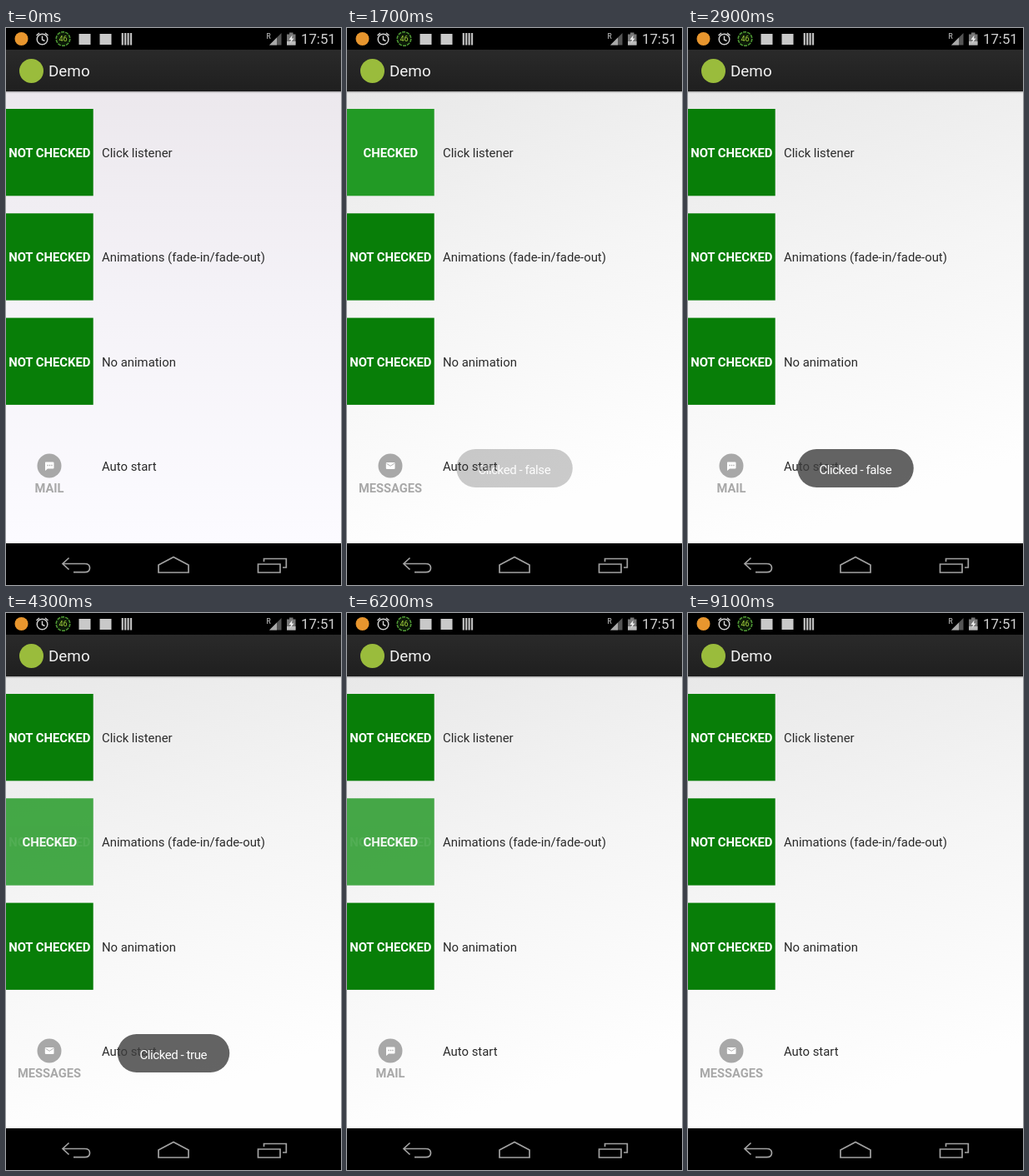
An HTML page for the animation above (9200 ms loop, 402 by 668 pixels).

```html
<!DOCTYPE html>
<html lang="en">
<head>
<meta charset="utf-8">
<title>Demo</title>
<style>
html, body { margin: 0; width: 100%; height: 100%; overflow: hidden; background: #000; }
svg { display: block; width: 100vw; height: 100vh; }
text { font-family: Roboto, "Noto Sans", sans-serif; font-size: 14.85px; }
.label { fill: #2a2a2a; }
.caption { font-weight: 700; text-anchor: middle; fill: #fff; }
.mail { font-size: 14.66px; font-weight: 700; text-anchor: middle; fill: #a8a8a8; }
.toast { font-size: 15px; letter-spacing: -.42px; text-anchor: middle; fill: #fff; }
.nav { fill: none; stroke: #a2a2a2; stroke-width: 1.7; }
</style>
</head>
<body>
<svg viewBox="0 0 402 668">
  <defs>
    <linearGradient id="page" x1="0" y1="0" x2=".25" y2="1">
      <stop offset="0" stop-color="#e8e8e8"/>
      <stop offset=".5" stop-color="#f5f5f5"/>
      <stop offset="1" stop-color="#fefefe"/>
    </linearGradient>
    <linearGradient id="tint" x1="0" y1="0" x2="0" y2="1">
      <stop offset="0" stop-color="#ece8ed"/>
      <stop offset=".5" stop-color="#f5f3f8"/>
      <stop offset="1" stop-color="#fcfbff"/>
    </linearGradient>
    <linearGradient id="bar" x1="0" y1="0" x2="0" y2="1">
      <stop offset="0" stop-color="#2a2a2a"/>
      <stop offset="1" stop-color="#1f1f1f"/>
    </linearGradient>
  </defs>

  <rect width="402" height="668"/>
  <rect y="76" width="402" height="542" fill="url(#page)"/>
  <rect id="wash" y="76" width="402" height="542" fill="url(#tint)"/>
  <rect y="26" width="402" height="50" fill="url(#bar)"/>
  <rect y="76" width="402" height="1.5" fill="#000" opacity=".22"/>

  <!-- status bar -->
  <circle cx="18.500" cy="13" r="8" fill="#e8962e"/>
  <g fill="none" stroke="#cfcfcf" stroke-width="1.5">
    <circle cx="43.500" cy="13.500" r="6.300"/>
    <path d="M43.500 9.500V14L46.500 15.500M36.500 9L40 6M50.500 9L47 6"/>
  </g>
  <circle cx="68.500" cy="13" r="8.300" fill="#0c1a08" stroke="#4f9a35" stroke-width="1.500" stroke-dasharray="4 1.200"/>
  <text x="68.500" y="16.300" text-anchor="middle" fill="#a5d33c" style="font-size:9px">46</text>
  <rect x="87.500" y="7" width="14" height="13" fill="#c9c9c9"/>
  <rect x="112.500" y="7" width="14" height="13" fill="#c9c9c9"/>
  <path d="M139.800 6V20.500M143.200 6V20.500M146.600 6V20.500M150 6V20.500" stroke="#bdbdbd" stroke-width="2.300"/>
  <text x="312.500" y="12.500" fill="#d0d0d0" style="font-size:8.500px">R</text>
  <path d="M316 20.500L330.500 6V20.500Z" fill="#555"/>
  <path d="M316 20.500L325 11.500V20.500Z" fill="#aaa"/>
  <path d="M337 7.500H340V5.500H344.500V7.500H347.500V20.500H337Z" fill="#777"/>
  <path d="M337 16H347.500V20.500H337Z" fill="#bbb"/>
  <path d="M343.500 8.500L339.500 14H342L341 18L345.500 12.500H343Z" fill="#eee"/>
  <text x="354" y="19" fill="#d2d2d2" style="font-size:16.800px">17:51</text>

  <!-- title bar -->
  <circle cx="30.500" cy="51.500" r="14.500" fill="#9abc3c"/>
  <text x="51" y="58.300" fill="#f3f3f3" style="font-size:18.850px">Demo</text>

  <g id="rows"></g>

  <!-- auto start item -->
  <circle cx="52" cy="525" r="14.500" fill="#a8a8a8"/>
  <g id="mail">
    <path d="M47.500 520.500H56.500Q57.500 520.500 57.500 521.500V527.500Q57.500 528.500 56.500 528.500H50L47 531V521Q47 520.500 47.500 520.500Z" fill="#fff"/>
    <path d="M49.400 524.500H55.600" stroke="#a8a8a8" stroke-width="1.300" stroke-dasharray="1.300 1.150"/>
    <text class="mail" x="52" y="557.200">MAIL</text>
  </g>
  <g id="messages">
    <rect x="46.800" y="521" width="10.700" height="8" rx="1" fill="#fff"/>
    <path d="M47.500 522.300L52.100 525.300L56.800 522.300" fill="none" stroke="#a8a8a8" stroke-width=".9"/>
    <text class="mail" x="52" y="557.200">MESSAGES</text>
  </g>

  <g id="toasts"></g>

  <!-- navigation bar -->
  <rect y="618" width="402" height="50"/>
  <g class="nav">
    <path d="M75.500 635.500L68 642.500L75.500 649.500M68 642.500H94.500Q100.500 642.500 100.500 647.500Q100.500 652.700 94.500 652.700H81"/>
    <path d="M183 653V644L201 634.500L219 644V653Z"/>
    <path d="M302.500 643H329V653H302.500ZM309.500 640V636.500H336.300V647H332"/>
  </g>
</svg>
<script>
const LOOP = 9200;
const $ = id => document.getElementById(id);
const clamp = v => Math.max(0, Math.min(1, v));
const ramp = (t, start, length) => clamp((t - start) / length);
const show = (node, alpha) => node.setAttribute('opacity', alpha.toFixed(3));

function tile(y, color, caption) {
  return `<g><rect y="${y}" width="104.7" height="104.3" fill="${color}"/>
    <text class="caption" x="52.3" y="${y + 58}">${caption}</text></g>`;
}

const labels = ['Click listener', 'Animations (fade-in/fade-out)', 'No animation', 'Auto start'];
$('rows').innerHTML = labels.map((label, i) => {
  const y = 97 + i * 125.3;
  const tiles = i < 3 ? tile(y, '#087e08', 'NOT CHECKED') + tile(y, '#229a25', 'CHECKED') : '';
  return `<g>${tiles}<text class="label" x="115" y="${y + 58}">${label}</text></g>`;
}).join('');
const rows = [...$('rows').children];

// Each toggle time flips the state with a linear cross-fade.
function toggled(t, times, length) {
  return times.reduce((sum, start, i) => sum + (i % 2 ? -1 : 1) * ramp(t, start, length), 0);
}

function crossfade(off, on, amount) {
  show(off, 1 - amount);
  show(on, amount);
}

const toasts = [
  { text: 'Clicked - false', width: 139.5, start: 1610 },
  { text: 'Clicked - true', width: 134.5, start: 3650 }
];
$('toasts').innerHTML = toasts.map(({ text, width }) =>
  `<g><rect x="${201 - width / 2}" y="505" width="${width}" height="46" rx="23" fill="#3e3e3e" fill-opacity=".8"/>
    <text class="toast" x="200.800" y="534.500">${text}</text></g>`).join('');

function toastAlpha(t, start) {
  const enter = ramp(t, start, 500);
  const leave = ramp(t, start + 2040, 500);
  return (1 - (1 - enter) ** 2) * (1 - leave ** 2);
}

const clicks = [
  { times: [1500, 2700], length: 180 },
  { times: [3800, 6050], length: 650 },
  { times: [], length: 0 }
];
const autoFlips = [0, 1, 2, 3, 4].map(i => 100 + i * 1800);

function draw(t) {
  show($('wash'), 1 - ramp(t, 0, 800));
  clicks.forEach(({ times, length }, i) => {
    const [off, on] = rows[i].children;
    crossfade(off, on, toggled(t, times, length));
  });
  crossfade($('mail'), $('messages'), toggled(t, autoFlips, 200));
  toasts.forEach(({ start }, i) => show($('toasts').children[i], toastAlpha(t, start)));
}

const begin = performance.now();
function tick() {
  draw((performance.now() - begin) % LOOP);
  requestAnimationFrame(tick);
}
tick();
</script>
</body>
</html>
```
